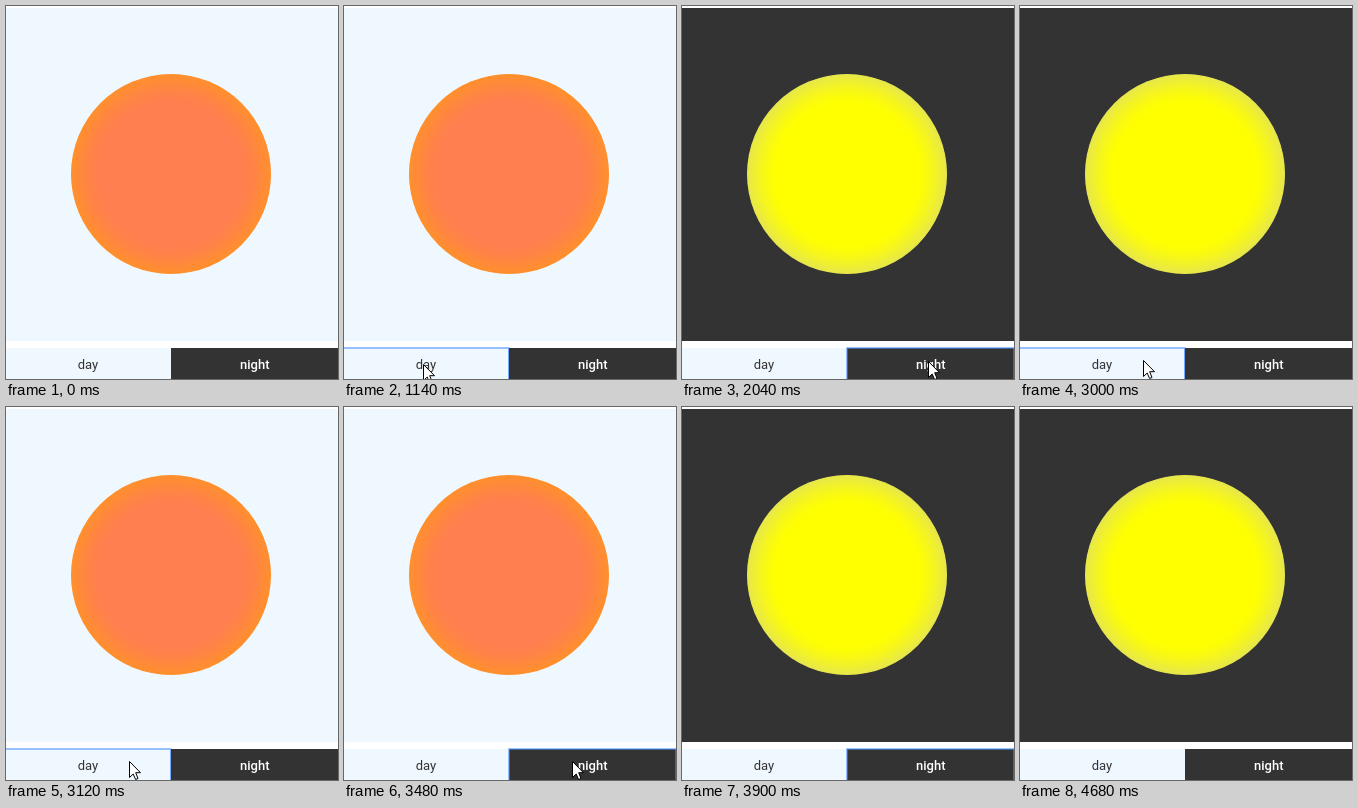
An HTML page for the animation above (4800 ms loop, 332 by 373 pixels).

```html
<!DOCTYPE html>
<html lang="en">
<head>
<meta charset="utf-8">
<title>Day and night switch</title>
<style>
  html, body { margin: 0; width: 100%; height: 100%; overflow: hidden; background: #fff; }
  svg { display: block; width: 332px; height: 373px; }
  text { font-family: Roboto, Arial, sans-serif; font-size: 13px; text-anchor: middle; }
  .ring { fill: none; stroke: #4d90fe; stroke-opacity: .75; stroke-width: 1.5; }
  .day { --sky: #f0f8ff; --core: #ff7f50; --rim: #ff902b; }
  .night { --sky: #333; --core: #ff0; --rim: #e6e64e; }
  #sky { fill: var(--sky); }
  #disc { fill: var(--core); }
  stop { stop-color: var(--rim); }
</style>
</head>
<body>
<svg id="stage" viewBox="0 0 332 373">
  <defs><radialGradient id="glow"></radialGradient></defs>
  <rect id="sky" y="2" width="332" height="333"/>
  <circle id="disc" cx="165" cy="168" r="99.5"/>
  <circle cx="165" cy="168" r="100" fill="url(#glow)"/>
  <rect y="342" width="165" height="31" fill="#f0f8ff"/>
  <rect id="dayRing" class="ring" x="-1" y="342" width="165.75" height="32"/>
  <rect x="165" y="342" width="167" height="31" fill="#333"/>
  <rect id="nightRing" class="ring" x="165" y="342" width="167" height="32"/>
  <text x="82" y="363" fill="#333">day</text>
  <text x="248.8" y="363" fill="#fff" font-weight="500">night</text>
  <path id="cursor" d="M.5 .5V16.5L4.2 13L6.6 18.5L9 17.5L6.7 11.7H11.5Z" fill="#fff" stroke="#000"/>
</svg>
<script>
const LOOP = 4800, TICK = 60;
const $ = id => document.getElementById(id);
const smooth = p => p * p * (3 - 2 * p);
const mix = (a, b, p) => Math.round(a + (b - a) * p);

// Rim colour fades in over the outer 30% of the disc
const STOPS = 12;
for (let i = 0; i <= STOPS; i++) {
  const stop = document.createElementNS('http://www.w3.org/2000/svg', 'stop');
  stop.setAttribute('offset', .7 + .3 * i / STOPS);
  stop.setAttribute('stop-opacity', (i / STOPS) ** 1.5);
  $('glow').append(stop);
}

const onDay = { x: 79, y: 358 }, onNight = { x: 246, y: 355 };
const dayEdge = { x: 123, y: 354 }, nightEdge = { x: 228, y: 354 };
const move = (start, end, from, to) => ({ start, end, from, to });
const moves = [
  move(120, 420, { x: 254, y: 132 }, { x: 75, y: 390 }),
  move(600, 720, { x: 83, y: 374 }, onDay),
  move(1380, 1740, onDay, onNight),
  move(2220, 2760, onNight, dayEdge),
  move(3120, 3360, dayEdge, nightEdge),
  move(3540, 3900, nightEdge, { x: 300, y: 375 })
];

// Pressing focuses a button; releasing switches the scene
const click = (button, press, release) => ({ button, press, release });
const clicks = [
  click('day', 1140, 1260),
  click('night', 1860, 2040),
  click('day', 3000, 3120),
  click('night', 3480, 3540)
];
const BLUR = 4680;

const last = (list, key, t) => list.filter(item => item[key] <= t).pop();
const show = (id, visible) => $(id).setAttribute('visibility', visible ? 'visible' : 'hidden');

function draw(now) {
  const t = Math.floor((now % LOOP) / TICK) * TICK;
  const focused = t < BLUR && last(clicks, 'press', t)?.button;
  $('stage').setAttribute('class', last(clicks, 'release', t)?.button ?? 'day');
  show('dayRing', focused === 'day');
  show('nightRing', focused === 'night');

  const trip = last(moves, 'start', t);
  show('cursor', trip);
  if (!trip) return;
  const { start, end, from, to } = trip;
  const p = smooth(Math.min(1, (t - start) / (end - start)));
  $('cursor').setAttribute('transform', `translate(${mix(from.x, to.x, p)} ${mix(from.y, to.y, p)})`);
}

const begin = performance.now();
function frame() {
  draw(performance.now() - begin);
  requestAnimationFrame(frame);
}
frame();
</script>
</body>
</html>
```
